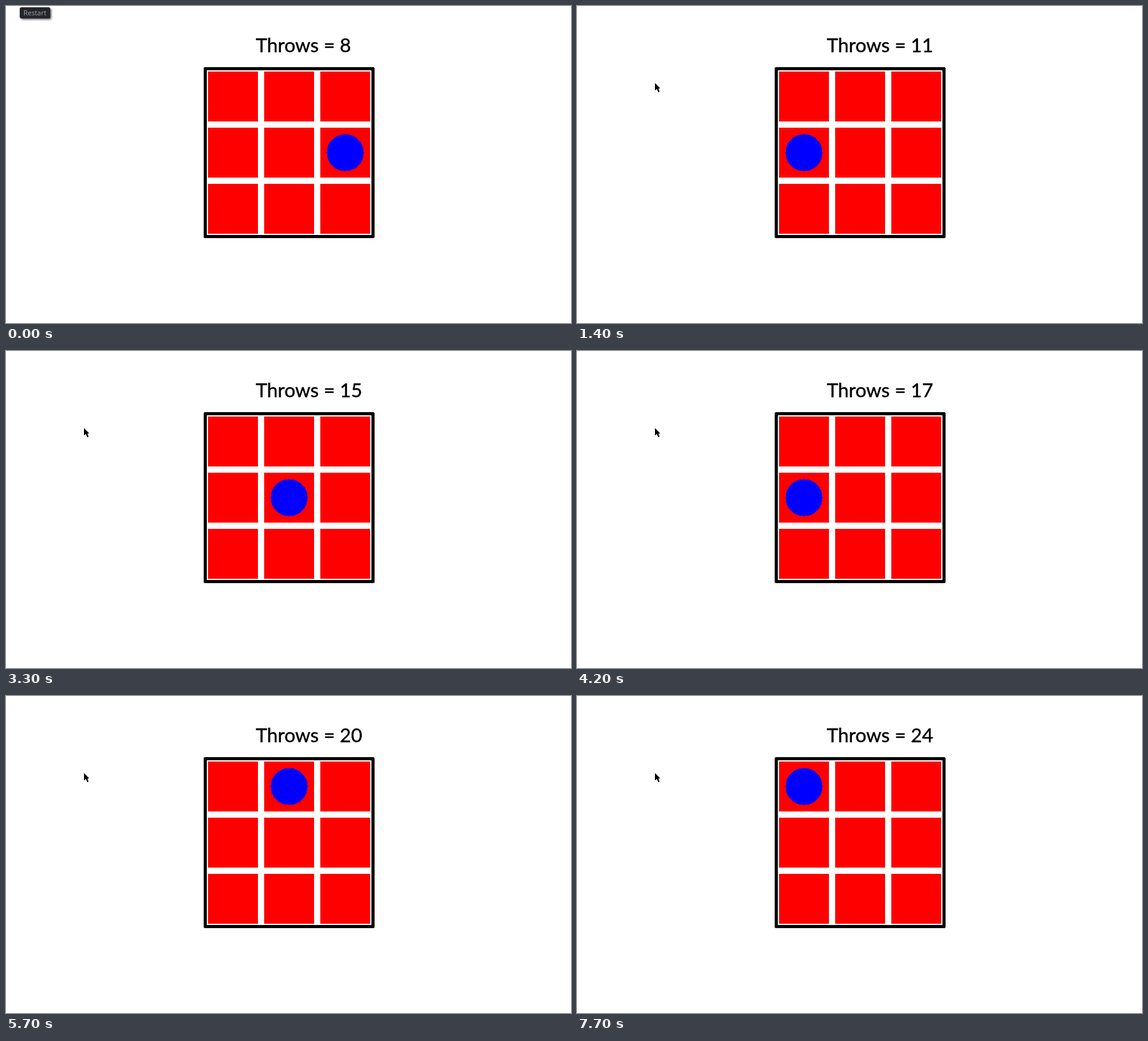
An HTML page for the animation above (8000 ms loop, 906x508 px).

```html
<!DOCTYPE html>
<html lang="en">
<head>
<meta charset="utf-8">
<title>Throws</title>
<style>
  html, body { margin: 0; width: 100%; height: 100%; overflow: hidden; background: #fff; }
  svg { display: block; shape-rendering: crispEdges; }
  #label { font: 31px "Comic Sans MS", Lato, sans-serif; stroke: #000; stroke-width: .4px; }
  #tip text { font: 11px "Open Sans", sans-serif; fill: #a0a0a0; }
  #tip rect { fill: #25262d; shape-rendering: auto; filter: drop-shadow(2px 2px 1.5px #0008); }
</style>
</head>
<body>
<svg width="906" height="508" viewBox="0 0 906 508">
  <text id="label" x="400.5" y="74"></text>
  <rect x="319.5" y="100.5" width="269" height="269" fill="none" stroke="#000" stroke-width="5" stroke-linejoin="round"/>
  <g id="cells" fill="#f00"></g>
  <circle id="ball" r="29.6" fill="#00f"/>
  <g id="tip">
    <rect x="22" y="2" width="49" height="18" rx="3"/>
    <text x="28" y="15">Restart</text>
  </g>
  <path id="cursor" d="M0 0V12.5L3 9.8L5.3 15H7.6L5.4 9.2H9Z"/>
</svg>
<script>
const LOOP = 8000, TICK = 100;
const FIRST_COUNT = 8, FIRST_MOVE = 360, INTERVAL = 478;
const CELL = 80, PITCH = 90, LEFT = 324, TOP = 105;

// The ball walks one cell per throw; a step off the board leaves it in place
const START = [2, 1], WALK = "WWWNNESWWNNEWWEW";
const STEP = { N: [0, -1], E: [1, 0], S: [0, 1], W: [-1, 0] };

const el = id => document.getElementById(id);
const label = el("label"), ball = el("ball"), tip = el("tip"), cursor = el("cursor");
const clamp = (v, low, high) => Math.max(low, Math.min(high, v));

function setAttrs(node, attrs) {
  for (const key in attrs) node.setAttribute(key, attrs[key]);
}

for (let i = 0; i < 9; i++) {
  const cell = document.createElementNS("http://www.w3.org/2000/svg", "rect");
  setAttrs(cell, {
    x: LEFT + i % 3 * PITCH, y: TOP + Math.floor(i / 3) * PITCH,
    width: CELL, height: CELL
  });
  el("cells").append(cell);
}

function cellAfter(moves) {
  return [...WALK.slice(0, moves)].reduce(
    (pos, dir) => pos.map((v, axis) => clamp(v + STEP[dir][axis], 0, 2)), START);
}

function draw(now) {
  const t = Math.floor(now % LOOP / TICK) * TICK;
  const moves = Math.max(0, Math.floor((t - FIRST_MOVE) / INTERVAL) + 1);
  const [col, row] = cellAfter(moves);
  label.textContent = "Throws = " + (FIRST_COUNT + moves);
  setAttrs(ball, { cx: LEFT + CELL / 2 + col * PITCH, cy: TOP + CELL / 2 + row * PITCH });

  // The pointer enters from above the stage and slows to a stop
  tip.style.display = t < TICK ? "" : "none";
  const p = 1 - (1 - Math.min(t / 500, 1)) ** 2;
  setAttrs(cursor, { transform: `translate(${Math.round(25 + 100 * p)} ${Math.round(-18 + 141 * p)})` });
}

function frame() {
  draw(performance.now());
  requestAnimationFrame(frame);
}
frame();
</script>
</body>
</html>
```
